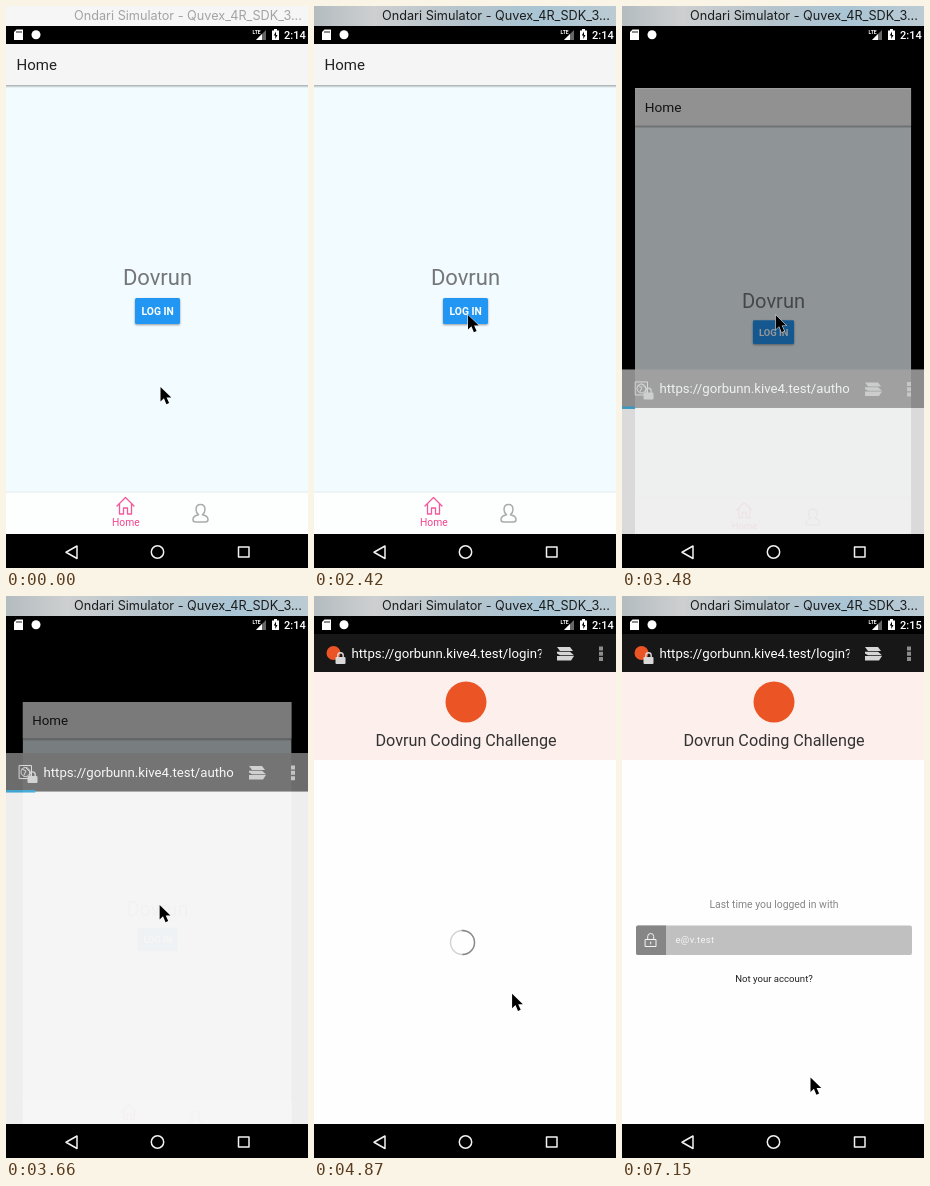
An HTML page that plays this animation: 302x562 px, repeating every 8 s.

```html
<!DOCTYPE html>
<html lang="en">
<head>
<meta charset="utf-8">
<title>Log in flow</title>
<style>
  html, body { margin: 0; height: 100%; overflow: hidden; background: #000; }
  svg { display: block; width: 100vw; height: 100vh; font-family: Roboto, sans-serif; }
  .mid { text-anchor: middle; }
  .line { fill: none; stroke-linejoin: round; stroke-linecap: round; }
</style>
</head>
<body>
<svg viewBox="0 0 302 562">
  <defs>
    <linearGradient id="sky">
      <stop offset="0" stop-color="#b4bcc0"/>
      <stop offset=".2" stop-color="#cdcfd0"/>
      <stop offset=".5" stop-color="#b5c4cc"/>
      <stop offset=".75" stop-color="#a9c5d5"/>
      <stop offset="1" stop-color="#bccbd3"/>
    </linearGradient>
    <linearGradient id="drop" x2="0" y2="1">
      <stop offset="0" stop-color="#000" stop-opacity=".32"/>
      <stop offset="1" stop-color="#000" stop-opacity="0"/>
    </linearGradient>
    <filter id="soft" x="-20%" y="-20%" width="140%" height="150%">
      <feDropShadow dx="0" dy="1" stdDeviation="1" flood-opacity=".4"/>
    </filter>
    <clipPath id="screen"><rect y="38" width="302" height="490"/></clipPath>
    <clipPath id="urlBox"><rect x="37" y="40" width="190.5" height="34"/></clipPath>
  </defs>

  <rect width="302" height="562"/>

  <g clip-path="url(#screen)">
    <g id="app">
      <rect y="38" width="302" height="490" fill="#f2fbff"/>
      <rect y="38" width="302" height="41" fill="#f5f5f5"/>
      <rect y="79" width="302" height="3" fill="url(#drop)"/>
      <text x="10.5" y="64" font-size="15" fill="#212121">Home</text>
      <text class="mid" x="151.5" y="278.5" font-size="22" fill="#747678">Dovrun</text>
      <rect x="129" y="292" width="45" height="26" rx="1.5" fill="#2196f3" filter="url(#soft)"/>
      <text class="mid" x="151.7" y="309.3" font-size="10.3" font-weight="700" fill="#fff">LOG IN</text>
      <rect y="486" width="302" height="42" fill="#fdfefe"/>
      <rect y="485.5" width="302" height="1" fill="#e6eced"/>
      <path class="line" d="M111 500l8.500-8.500 8.500 8.500M113.500 498v10h4v-6h4v6h4v-10" stroke="#f2589c" stroke-width="1.3"/>
      <text class="mid" x="119.800" y="520" font-size="10.3" fill="#f2458f">Home</text>
      <path class="line" d="M194.500 498.500c-3 0-4.500 2.200-4.500 5 0 2.500 1 4 2.500 5.200-3.500.8-5.500 2.300-5.500 4.800 0 1.500 1 2.500 2.500 2.500h10c1.500 0 2.500-1 2.500-2.500 0-2.500-2-4-5.500-4.800 1.500-1.200 2.500-2.700 2.500-5.200 0-2.800-1.500-5-4.500-5z" stroke="#a9abac" stroke-width="1.5"/>
      <rect id="dim" y="38" width="302" height="490"/>
    </g>

    <g id="browser">
      <rect y="76" width="302" height="452" fill="#fefefe"/>
      <rect id="bar" y="38" width="302" height="38.500"/>
      <g id="globe" class="line" stroke="#e4e4e4" stroke-width="1">
        <path d="M13.500 50.500h12v13h-12z"/>
        <circle cx="19.500" cy="57" r="4.500"/>
        <path d="M16 54l4 2-2 4M20 53l3 3"/>
      </g>
      <circle id="badge" cx="19.500" cy="57" r="7" fill="#eb5424"/>
      <rect x="21.500" y="61" width="10" height="7" rx="1" fill="#d9d9d9"/>
      <path class="line" d="M23.800 61v-1.500a2.700 2.700 0 0 1 5.400 0v1.500" stroke="#d9d9d9" stroke-width="1.4"/>
      <g clip-path="url(#urlBox)">
        <text id="url" x="37.500" y="62" font-size="13.200" fill="#fff"></text>
      </g>
      <g fill="#d6d6d6">
        <path d="M243 51h13l3 4h-13zM243 55.700h13l4 3.600h-14l-3-1.800zM243 60h17l-3 4.500h-14z"/>
        <path id="menu" d="M285 50.500h4v4h-4zM285 55.800h4v4h-4zM285 61.100h4v4h-4z" fill="#8d8d8d"/>
      </g>
      <g id="page">
        <rect y="76" width="302" height="88" fill="#fdefeb"/>
        <circle cx="152" cy="106" r="20.500" fill="#eb5424"/>
        <text class="mid" x="152" y="150" font-size="16.200" fill="#333">Dovrun Coding Challenge</text>
        <g id="spinner" class="line" stroke-width="1.4">
          <circle cx="148.500" cy="346.500" r="12" stroke="#d2d2d2"/>
          <path id="arc" d="M140 338a12 12 0 0 1 17 17" stroke="#8a8a8a"/>
        </g>
        <g id="form">
          <text class="mid" x="152" y="311.500" font-size="10.400" fill="#868686">Last time you logged in with</text>
          <rect x="14" y="329.500" width="276" height="29.500" rx="2" fill="#c0c0c0"/>
          <path d="M44 329.500H16a2 2 0 0 0-2 2V357a2 2 0 0 0 2 2h28z" fill="#868686"/>
          <path class="line" d="M23.500 343.500h10.500v7H23.500zM25.700 343.500v-3a3 3 0 0 1 6 0v3M28.700 346v2" stroke="#f4f4f4"/>
          <text x="53.500" y="347" font-size="9.400" letter-spacing=".4" fill="#f5f5f5">e@v.test</text>
          <text class="mid" x="152" y="385.500" font-size="9.600" fill="#222">Not your account?</text>
        </g>
      </g>
      <rect id="load" y="75" height="2.500" fill="#45b1de"/>
    </g>
  </g>

  <rect id="titleBar" width="302" height="20"/>
  <text id="title" x="68" y="14.300" font-size="12.700" font-family="Inter, sans-serif">Ondari Simulator - Quvex_4R_SDK_3...</text>

  <g fill="#fff">
    <path d="M10.500 23.500H17v10.500H8v-8z"/>
    <path d="M11 25v2M13 25v2M15 25v2" stroke="#000" stroke-width=".9"/>
    <circle cx="30" cy="28.800" r="4.500"/>
    <text x="246.500" y="28" font-size="5" font-weight="700">LTE</text>
    <path d="M260 24v10h-10z" fill="#666"/>
    <path d="M256 28v6h-6z"/>
    <path d="M266 24.500h2v-1.500h3v1.500h2V34h-7z"/>
    <path d="M270 25.500l-2.200 4h1.500V33l2.200-4H270z" fill="#000"/>
    <text id="clock" x="278" y="33" font-size="11" font-weight="500"></text>
  </g>

  <g class="line" stroke="#f2f2f2" stroke-width="1.500">
    <path d="M71 540v12.500l-11-6.250z"/>
    <circle cx="151.500" cy="546" r="6.200"/>
    <path d="M232.500 541h10.500v10h-10.500z"/>
  </g>

  <path id="cursor" d="M0 0v14.500l3.400-3.200 2.500 5.900 2.700-1.200-2.500-5.600h4.700z" stroke="#fff" stroke-width="1" paint-order="stroke"/>
</svg>
<script>
const LOOP = 8000;
const el = id => document.getElementById(id);
const set = (id, attrs) => {
  for (const name in attrs) el(id).setAttribute(name, attrs[name]);
};
const show = (id, on) => set(id, { opacity: +on });

// Linear interpolation through [time, value] pairs
function track(t, keys) {
  const i = keys.findIndex(k => k[0] > t);
  if (i < 0) return keys[keys.length - 1][1];
  if (i === 0) return keys[0][1];
  const [t0, a] = keys[i - 1], [t1, b] = keys[i];
  return a + (b - a) * (t - t0) / (t1 - t0);
}
const ramp = (t, from, to) => track(t, [[from, 0], [to, 1]]);
const smooth = u => u * u * (3 - 2 * u);

// Pointer tip as time, x, y
const moves = [
  [180, 154.5, 381], [300, 154.5, 358], [450, 154, 322], [630, 153.5, 303],
  [2060, 153.5, 303], [2061, 153.5, 304], [2360, 153.5, 304], [2420, 154, 309],
  [4060, 153.5, 309], [4350, 152.5, 321], [4820, 195, 389], [5150, 215, 446],
  [5400, 212, 470], [5630, 206.5, 478], [5750, 206.5, 478], [6380, 197.5, 480.5],
  [6499, 197.5, 480.5], [6500, 196, 480.5], [6799, 196, 480.5], [6800, 195, 481.5],
  [7099, 195, 481.5], [7100, 191, 481.5], [7149, 191, 481.5], [7150, 188.5, 481.5]
];
const xKeys = moves.map(m => [m[0], m[1]]);
const yKeys = moves.map(m => [m[0], m[2]]);

function draw(t) {
  const focused = t >= 1460;
  set('titleBar', { fill: focused ? 'url(#sky)' : '#f6f6f6' });
  set('title', { fill: focused ? '#1c1c1c' : '#a3a3a3' });
  el('clock').textContent = t < 6000 ? '2:14' : '2:15';

  const leaving = t >= 3240;
  const scale = leaving ? track(t, [[3240, .987], [3480, .914], [3860, .86]]) : 1;
  const sink = leaving ? track(t, [[3240, .5], [3480, 23], [3860, 60]]) : 0;
  set('app', { transform: `translate(151.5 ${283 + sink}) scale(${scale}) translate(-151.5 -283)` });
  set('dim', { opacity: leaving ? track(t, [[3240, .13], [3480, .41], [3860, .6]]) : 0 });

  const rise = smooth(ramp(t, 3240, 3860));
  const shade = track(t, [[3560, 163], [3860, 23]]);
  set('browser', {
    transform: `translate(0 ${490 * (1 - rise)})`,
    opacity: track(t, [[3240, .7], [3480, .86], [3800, 1]])
  });
  set('bar', { fill: `rgb(${shade},${shade},${shade})` });
  set('menu', { fill: shade > 90 ? '#cfcfcf' : '#8d8d8d' });
  el('url').textContent = 'https://gorbunn.kive4.test/' + (t < 4060 ? 'authorize' : 'login?state');
  set('load', { width: track(t, [[3240, 5], [3480, 13], [4000, 60], [4350, 90], [4650, 302]]) });
  show('load', t < 4700);

  show('page', t >= 4600);
  show('globe', t < 4780);
  show('badge', t >= 4780);
  const ready = ramp(t, 6100, 6350);
  show('form', ready);
  show('spinner', 1 - ready);
  set('arc', { transform: `rotate(${(t - 5750) * .36} 148.5 346.5)` });

  set('cursor', { transform: `translate(${track(t, xKeys)} ${track(t, yKeys)})` });
}

function tick() {
  draw(performance.now() % LOOP);
  requestAnimationFrame(tick);
}
tick();
</script>
</body>
</html>
```
